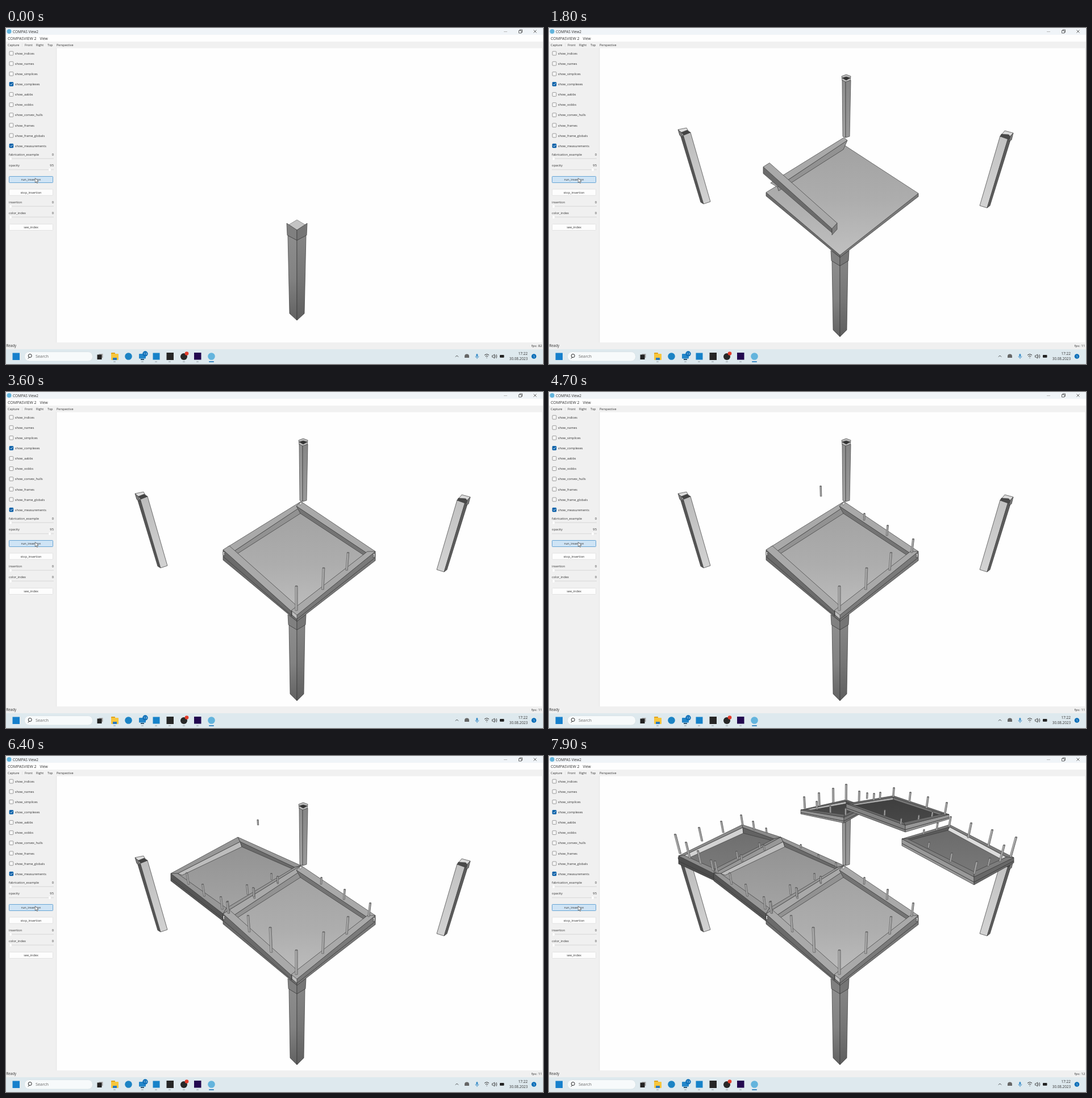
These frames come from a looping animation (945x592 px, 8000 ms). An HTML page with a canvas:

```html
<!DOCTYPE html>
<html lang="en">
<head>
<meta charset="utf-8">
<title>Assembly viewer</title>
<style>
html,body{margin:0;width:100%;height:100%;overflow:hidden;background:#fff}
svg,canvas{position:absolute;left:0;top:0;width:945px;height:592px;display:block}
text{font-family:"Open Sans","Noto Sans",sans-serif;fill:#333}
</style>
</head>
<body>
<canvas id="view" width="945" height="592"></canvas>
<svg id="ui" viewBox="0 0 945 592"></svg>
<script>
const LOOP = 8000, STEP = 100;
const ui = document.getElementById('ui');
const g = document.getElementById('view').getContext('2d');

// ---------- window chrome ----------
function el(tag, attrs, text) {
  const e = document.createElementNS('http://www.w3.org/2000/svg', tag);
  for (const k in attrs) e.setAttribute(k, attrs[k]);
  if (text !== undefined) e.textContent = text;
  ui.append(e);
  return e;
}
const box = (x, y, width, height, fill, more) => el('rect', {x, y, width, height, fill, ...more});
const dot = (cx, cy, r, fill) => el('circle', {cx, cy, r, fill});
const line = (d, stroke = '#444', w = .8) => el('path', {d, stroke, 'stroke-width': w, fill: 'none'});
const label = (s, x, y, size = 5.6, more) => el('text', {x, y, 'font-size': size, ...more}, s);
const mid = {'text-anchor': 'middle'}, end = {'text-anchor': 'end'};

function slider(name, value, y, knob) {
  label(name, 5, y + 2);
  label(value, 84, y + 2, 5.8, end);
  box(5, y + 7, 79, 1.2, '#dcdcdc');
  box(knob - 2, y + 5, 4, 5.5, '#fff', {rx: 1, stroke: '#e2e2e2', 'stroke-width': .4});
}
function button(name, y, fill = '#fdfdfd', stroke = '#e0e0e0') {
  box(5.5, y + .5, 77, 11, fill, {stroke, 'stroke-width': .9, rx: .8});
  label(name, 44, y + 8, 5.6, mid);
}
function buildUi() {
  box(0, 0, 945, 12, '#f0f4f8');
  box(0, 12, 945, 12, '#fefefe');
  box(0, 24, 945, 11.5, '#f1f1f1');
  box(0, 35, 89, 519, '#f0f0f0');
  box(88.4, 35, .8, 519, '#e2e2e2');
  box(944, 35, 1, 519, '#e4e4e4');
  box(0, 554, 945, 12, '#f0f0f0');
  box(0, 566, 945, 26, '#dee9ee');
  dot(5.5, 6, 4, '#62b4dc');
  label('COMPAS View2', 12, 8.5, 6.4);
  label('COMPASVIEW 2', 3, 21, 7);
  label('View', 59.5, 21, 6.5);
  [['Capture', 3], ['Front', 33], ['Right', 53], ['Top', 73], ['Perspective', 89]]
    .forEach(([s, x]) => label(s, x, 31.6, 5.5));
  line('M28.5 27V33', '#ddd', .6);
  line('M876 6.5H882', '#aaa');
  line('M902.5 4.5H907V9H902.5ZM904 4.5V3H908.5V7.5H907');
  line('M928.5 3.5L933.5 8.5M933.5 3.5L928.5 8.5');

  ['indices', 'names', 'simplices', 'complexes', 'aabbs', 'oobbs', 'convex_hulls',
    'frames', 'frame_globals', 'measurements'].forEach((s, i) => {
    const y = 44.5 + i * 18.1, on = i === 3 || i === 9;
    box(6, y - 3.3, 6.8, 6.8, on ? '#075fa8' : '#f6f6f6', {rx: 1, stroke: on ? '#075fa8' : '#777', 'stroke-width': .7});
    if (on) line(`M7.4 ${y}l1.5 1.6 2.7-3.1`, '#fff', .9);
    label('show_' + s, 15.8, y + 2.3, 5.55);
  });
  slider('fabrication_example', 0, 222.5, 8);
  slider('opacity', 95, 242, 77);
  button('run_insertion', 261, '#cfe4f5', '#5a9ed2');
  button('stop_insertion', 283.5);
  slider('insertion', 0, 306.5, 8);
  slider('color_index', 0, 325.5, 8);
  button('see_index', 345);
  el('path', {d: 'M51.3 264.5V272.5L53.2 270.8 54.5 273.6 55.6 273.1 54.4 270.4H57Z', fill: '#fff', stroke: '#333', 'stroke-width': .6});
  label('Ready', .5, 562.3, 6.2);

  // taskbar
  box(11.5, 572.5, 12.5, 12.5, '#1680cc');
  box(32.5, 570.5, 120, 16.5, '#f7fafb', {rx: 8, stroke: '#cfdadf', 'stroke-width': .6});
  line('M45.2 577.5A3 3 0 1 1 39.2 577.5A3 3 0 1 1 45.2 577.5M41 580L38.8 582.5', '#222', 1);
  label('Search', 52, 581, 7.3, {style: 'fill:#666'});
  box(163.5, 574, 7, 7, '#aaa');
  box(160.5, 575.5, 8, 8.5, '#222');
  box(185, 572, 7, 4, '#e0a21b', {rx: 1});
  box(185, 574, 13, 11, '#f8c63d', {rx: 1});
  box(188, 581, 7, 4, '#2979bd');
  dot(215.5, 578.5, 6.3, '#1b83c4');
  box(234, 574, 12, 8.5, '#2386c9', {rx: 1});
  box(237, 583, 6, 2, '#315a78');
  dot(245, 574, 4.7, '#0b6db7');
  label('13', 245, 576.1, 5.4, {...mid, style: 'fill:#fff'});
  box(258.5, 572.5, 12, 12, '#1682c9');
  box(282.5, 572, 12.5, 13, '#262626');
  dot(313, 579, 6, '#282828');
  dot(318, 573.5, 3.3, '#e43c2b');
  box(331, 572, 12.5, 12.5, '#23084f');
  dot(361.5, 578.5, 6.3, '#63b4dd');
  [191, 240, 264, 288, 313, 337].forEach(x => box(x - 2, 587.4, 4, 1.2, '#8b969c', {rx: .6}));
  box(357, 587.2, 9, 1.5, '#0a6cb5', {rx: .7});

  // tray
  line('M791 579.5L793.5 577L796 579.5', '#222');
  el('path', {d: 'M807 581V578.5A4 4 0 0 1 815 578.5V581Z', fill: '#666'});
  box(827.4, 574, 3, 5.5, '#3d8fc9', {rx: 1.5});
  line('M826 578A3 3 0 0 0 832 578M829 581V583', '#3d8fc9');
  line('M842 576.5Q846 573 850 576.5M843.7 578.7Q846 576.7 848.3 578.7M845.5 581H846.7', '#333', 1);
  line('M855.5 577H857.2L859.5 575V582L857.2 580H855.5ZM861 576.5Q862.5 578.5 861 580.5M862.7 575Q865 578.5 862.7 582', '#333');
  box(869, 576, 7.5, 4.8, '#222', {rx: 1});
  label('17:22', 918, 575.8, 6.5, end);
  label('30.08.2023', 918, 585.3, 6.3, end);
  dot(929, 578.5, 4.3, '#0b6fb9');
  label('1', 929, 580.6, 5.6, {...mid, style: 'fill:#fff'});
}

// ---------- drawing helpers ----------
const clamp = v => Math.max(0, Math.min(1, v));
const ramp = (t, [start, span]) => clamp((t - start) / span);
const down = ([x, y], h) => [x, y + h];

function poly(pts, fill, stroke = '#3c3c3c', w = .7) {
  g.beginPath();
  pts.forEach(([x, y]) => g.lineTo(x, y));
  g.closePath();
  if (Array.isArray(fill)) {
    const ys = pts.map(p => p[1]);
    const gr = g.createLinearGradient(0, Math.min(...ys), 0, Math.max(...ys));
    fill.forEach((c, i) => gr.addColorStop(i / (fill.length - 1), c));
    fill = gr;
  }
  g.fillStyle = fill;
  g.fill();
  g.strokeStyle = stroke;
  g.lineWidth = w;
  g.stroke();
}
function shifted(dx, dy, draw) {
  g.save();
  g.translate(dx, dy);
  draw();
  g.restore();
}

// ---------- legs ----------
function frontLeg(p) {
  const at = (x0, y0, x1, y1) => [x0 + (x1 - x0) * p, y0 + (y1 - y0) * p];
  const flip = ([x, y]) => [1024 - x, y];
  const top = at(494, 344, 496, 392), topMid = at(512, 356, 512, 404);
  const rim = at(495, 365, 497, 410), rimMid = at(512, 374, 512, 419);
  const foot = at(499, 503, 500, 532), footMid = at(512, 515, 512, 544);
  const neck = [rim[0] + 1, rim[1] + .5];
  const back = at(512, 338, 512, 382), side = at(497, 347, 498, 393);
  poly([back, flip(side), topMid, side], '#c4c4c4', '#777');
  const shaft = [neck, rimMid, footMid, foot], cap = [top, topMid, rimMid, rim];
  poly(shaft, ['#8d8d8d', '#828282', '#616161']);
  poly(shaft.map(flip), ['#858585', '#767676', '#5e5e5e']);
  poly(cap, '#808080');
  poly(cap.map(flip), '#757575');
}
const legs = [
  {when: [200, 250], faces: [
    [[[794, 190], [808, 194], [771, 317], [758, 313]], ['#c2c2c2', '#d3d3d3']],
    [[[808, 194], [814, 191], [776, 313], [771, 317]], '#5c5c5c'],
    [[[802, 181], [817, 185], [812, 193], [797, 187]], '#dadada'],
    [[[796, 187], [809, 188], [813, 193], [808, 196], [794, 191]], '#4a4a4a'],
    [[[812, 190], [817, 185], [814, 197], [809, 200]], '#777']]},
  {when: [450, 250], faces: [
    [[[515, 85], [523, 82], [531, 85], [530, 93], [523, 96], [516, 93]], '#bdbdbd'],
    [[[516, 88], [523, 86], [530, 88], [523, 92]], '#333'],
    [[[516, 92], [522, 95], [522, 193], [517, 191]], ['#8f8f8f', '#a5a5a5']],
    [[[522, 95], [531, 92], [529, 191], [522, 193]], ['#868686', '#999']]]},
  {when: [700, 250], faces: [
    [[[231, 188], [237, 190], [272, 310], [267, 307]], '#555'],
    [[[236, 188], [249, 184], [284, 306], [272, 310]], ['#bcbcbc', '#d2d2d2']],
    [[[227, 179], [242, 176], [245, 181], [233, 185]], '#dedede'],
    [[[227, 179], [233, 184], [236, 193], [230, 189]], '#777'],
    [[[233, 184], [243, 180], [249, 184], [237, 189]], '#444']]}
];

// ---------- panels: corners run left, back, right, front ----------
const panels = [
  {o: [[382,278],[519,193],[650,281],[512,393]], f: [[404,287],[518,214],[629,287],[512,378]], h: [18,20,16,11],
    tops: [[[390,273],[519,193],[525,198],[402,280]], [[519,193],[650,281],[634,283],[511,201]],
      [[650,281],[512,393],[502,385],[636,281]], [[503,387],[382,278],[393,271],[512,377]]],
    top: '#a9a9a9', walls: ['#929292', '#747474'], front: ['#7a7a7a', '#6b6b6b'], floor: ['#a2a2a2', '#adadad', '#c0c0c0'],
    pegs: [511,342,43, 559,310,38, 602,283,31, 641,259,24, 596,235,18, 555,214,12, 478,213,12, 436,233,18, 390,256,21, 426,281,29, 465,302,44],
    drop: 100, pegDrop: 118,
    times: [[950,350], [1300,300], [1600,300], [1900,300], [2200,300],
      ...[2500,2900,3300,3700,3970,4240,4550,4850,5100,5350,5600].map(s => [s, 250])]},
  {o: [[290,207],[408,143],[519,193],[382,278]], i: [[302,207],[412,151],[508,196],[388,268]], f: [[310,210],[415,160],[504,199],[390,266]], h: [13,8,8,13],
    top: '#979797', walls: ['#bdbdbd', '#6a6a6a'], front: ['#777', '#565656'], floor: ['#919191', '#a6a6a6'],
    pegs: [318,206,20, 346,226,21, 378,248,22, 389,257,20, 424,227,17, 435,232,16, 467,207,11, 478,212,11, 443,156,6, 474,174,6, 505,188,7], start: 6010, span: 470},
  {o: [[228,176],[340,121],[408,143],[290,207]], i: [[238,175],[341,126],[396,146],[292,199]], f: [[243,181],[342,136],[392,149],[293,196]], h: [14,7,8,12],
    top: '#8b8b8b', walls: ['#d3d3d3', '#626262'], front: ['#666', '#4d4d4d'], floor: ['#6d6d6d', '#7c7c7c'],
    pegs: [222,138,34, 264,126,24, 303,115,20, 338,104,18, 359,115,15, 382,127,8, 370,153,10, 378,157,9, 330,168,14, 338,174,12, 285,183,19, 292,185,21, 241,152,28, 262,167,23], start: 6480, span: 520},
  {o: [[443,95],[523,77],[558,90],[519,108]], i: [[452,94],[523,80],[547,90],[520,103]], f: [[457,96],[523,84],[542,92],[520,101]], h: [7,4,6,10],
    top: '#666', walls: ['#bababa', '#555'], front: ['#777', '#929292'], floor: ['#404040', '#505050'],
    pegs: [449,72,20, 475,65,23, 500,57,25, 523,50,28, 471,80,14, 495,88,12, 522,92,12, 546,62,18, 560,65,10], start: 7110, span: 250},
  {o: [[523,84],[606,70],[704,103],[627,122]], i: [[533,85],[606,73],[693,102],[624,117]], f: [[538,87],[606,77],[688,104],[622,115]], h: [11,4,8,12],
    top: '#6a6a6a', walls: ['#b0b0b0', '#777'], front: ['#979797', '#828282'], floor: ['#3e3e3e', '#4a4a4a'],
    pegs: [572,66,12, 583,64,12, 607,56,16, 636,64,17, 667,72,20, 700,82,21, 591,95,10, 651,104,8, 675,98,9, 620,110,10], start: 7360, span: 250},
  {o: [[621,146],[705,121],[818,179],[748,213]], i: [[631,146],[705,125],[805,178],[748,204]], f: [[636,148],[702,131],[796,182],[747,203]], h: [12,6,9,14],
    top: '#7d7d7d', walls: ['#5b5b5b', '#dcdcdc'], front: ['#686868', '#989898'], floor: ['#6a6a6a', '#7b7b7b'],
    pegs: [660,130,8, 684,118,13, 707,107,18, 743,118,26, 780,130,30, 822,143,35, 801,157,29, 709,171,16, 753,186,22, 776,180,14, 669,152,10], start: 7610, span: 280}
];
for (const p of panels) {
  p.tops ??= p.o.map((c, k) => [c, p.o[(k + 1) % 4], p.i[(k + 1) % 4], p.i[k]]);
  p.drop ??= 45;
  p.pegDrop ??= 60;
  if (!p.times) {
    const n = 5 + p.pegs.length / 3, d = p.span / n;
    p.times = Array.from({length: n}, (_, k) => [p.start + k * d, d]);
  }
}
const BEAM_PART = [1, 3, 4, 2]; // build order of the four beams

function drawPlate(p, t) {
  if (t < p.times[0][0]) return;
  const q = ramp(t, p.times[0]);
  const up = p.o.map((c, k) => down(c, p.h[k] * .65));
  const low = p.o.map((c, k) => down(c, p.h[k]));
  shifted(0, -p.drop * 1.2 * (1 - q), () => {
    poly([up[0], up[3], low[3], low[0]], p.front[1]);
    poly([up[3], up[2], low[2], low[3]], p.front[0]);
    poly(up, p.floor);
  });
}
function drawBeam(p, k, t) {
  const when = p.times[BEAM_PART[k]];
  if (t < when[0]) return;
  const q = ramp(t, when), [a, b, c, d] = p.tops[k];
  const ha = p.h[k] * .65, hb = p.h[(k + 1) % 4] * .65;
  shifted(-15 * (1 - q) * (k === 3), -p.drop * (1 - q), () => {
    if (k < 2) poly([d, c, p.f[(k + 1) % 4], p.f[k]], p.walls[k]);
    else poly([a, b, down(b, hb), down(a, ha)], p.front[k - 2]);
    if (k === 3 && q < 1) poly([a, d, down(d, 11), down(a, 11)], '#808080');
    poly([a, b, c, d], p.top);
  });
}
function drawPanel(p, t) {
  drawPlate(p, t);
  [0, 1, 3, 2].forEach(k => drawBeam(p, k, t));
  if (p === panels[0] && t >= 2500) {
    // corner joints
    for (const [x, y, s] of [[382, 281, 1], [649, 284, -1]]) {
      poly([[x, y], [x + 3 * s, y + 1], [x + 2 * s, y + 4], [x + 3 * s, y + 8], [x, y + 6]], '#f4f4f4', '#333');
    }
    poly([[502, 385], [503, 387], [503, 395], [502, 394]], '#444', '#444', .4);
    poly([[516, 196], [519, 194], [521, 196], [518, 200]], '#d8d8d8', '#555', .5);
  }
}
function drawPegs(p, t) {
  for (let n = 0; n < p.pegs.length; n += 3) {
    const when = p.times[5 + n / 3];
    if (t < when[0]) continue;
    const [x, y, len] = p.pegs.slice(n, n + 3);
    const top = y - p.pegDrop * (1 - ramp(t, when));
    const l = Math.min(len * 1.5, y + len - top);
    const lean = (512 - x) * .0009 * l, w = 1 + len / 45;
    poly([[x - w, top], [x + w, top], [x + lean + w, top + l], [x + lean - w, top + l]], '#c6c6c6', '#444', .65);
    poly([[x, top + 1], [x + w, top], [x + lean + w, top + l], [x + lean, top + l]], '#969696', '#666', .3);
    poly([[x - w, top], [x, top - .8], [x + w, top], [x, top + .9]], '#ddd', '#333', .6);
  }
}
function looseBeam(t) {
  if (t < 7000 || t >= 7200) return;
  const s = (t - 7100) / 100;
  shifted(14 * s, -7 * s, () => {
    poly([[250, 230], [308, 201], [314, 206], [257, 233]], '#d2d2d2');
    poly([[257, 233], [314, 206], [314, 212], [256, 237]], '#a6a6a6');
    poly([[250, 230], [257, 233], [256, 237], [252, 234]], '#4a4a4a');
  });
}

buildUi();
const fps = label('', 924.5, 562.3, 6.1);

function draw(t) {
  g.fillStyle = '#fefefe';
  g.fillRect(0, 0, 945, 592);
  for (const leg of legs) {
    if (t < leg.when[0]) continue;
    shifted(0, -70 * (1 - ramp(t, leg.when)), () => leg.faces.forEach(([pts, c]) => poly(pts, c)));
  }
  frontLeg(ramp(t, [0, 200]));
  looseBeam(t);
  [3, 4, 5, 2, 1, 0].forEach(k => drawPanel(panels[k], t));
  panels.forEach(p => drawPegs(p, t));
  fps.textContent = 'fps: ' + (t < 200 ? 82 : t < 7300 ? 11 : 12);
}
function tick() {
  draw(Math.floor(performance.now() % LOOP / STEP) * STEP);
  requestAnimationFrame(tick);
}
tick();
</script>
</body>
</html>
```
